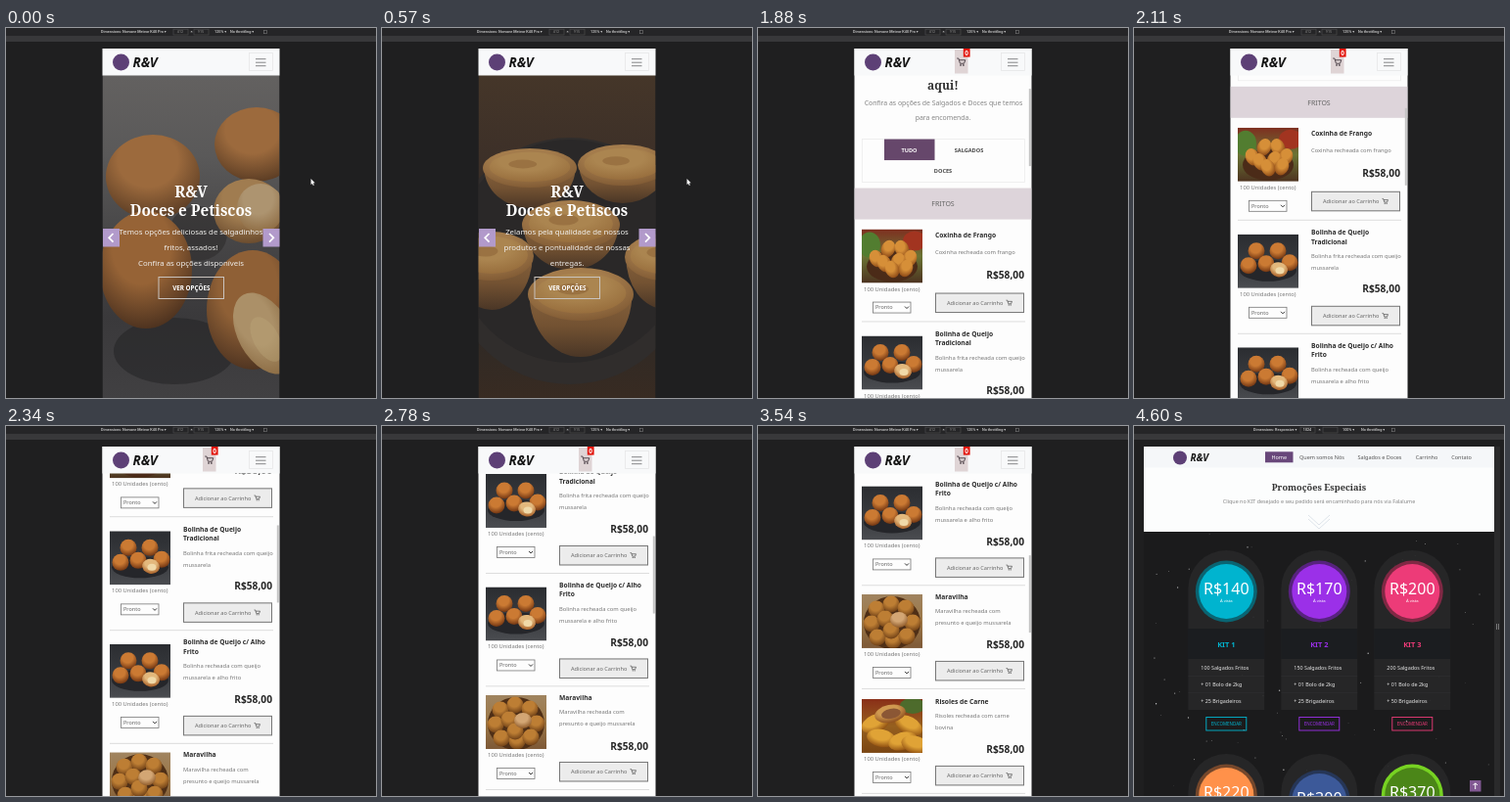
An HTML page with a canvas for the animation above (4630 ms loop, 378 by 378 pixels).

```html
<!DOCTYPE html>
<html lang="pt-BR">
<head>
<meta charset="utf-8">
<title>Loja de doces e petiscos</title>
<style>
html, body { margin: 0; width: 100%; height: 100%; overflow: hidden; background: #1f1f1f; }
canvas { display: block; width: 378px; height: 378px; }
</style>
</head>
<body>
<canvas id="stage"></canvas>
<script>
const SIZE = 378, LOOP = 4630, SHOP_AT = 1540, DESKTOP_AT = 3620;
const SANS = '"Noto Sans", "Open Sans", sans-serif';
const SERIF = '"Noto Serif", serif';
const UI = 'Roboto, sans-serif';

const canvas = document.getElementById('stage');
const ctx = canvas.getContext('2d');
const ratio = window.devicePixelRatio || 1;
canvas.width = canvas.height = Math.round(SIZE * ratio);

function rect(x, y, w, h, color) {
  ctx.fillStyle = color;
  ctx.fillRect(x, y, w, h);
}

function frame(x, y, w, h, color, line = 1) {
  ctx.strokeStyle = color;
  ctx.lineWidth = line;
  ctx.strokeRect(x, y, w, h);
}

function oval(x, y, rx, ry, color, turn = 0, end = 7) {
  ctx.fillStyle = color;
  ctx.beginPath();
  ctx.ellipse(x, y, rx, ry, turn, 0, end);
  ctx.fill();
}

function path(points, color, line = 1) {
  ctx.strokeStyle = color;
  ctx.lineWidth = line;
  ctx.beginPath();
  points.forEach(([x, y]) => ctx.lineTo(x, y));
  ctx.stroke();
}

function text(str, x, y, size, color, { weight = 400, family = SANS, align = 'left' } = {}) {
  ctx.font = `${weight} ${size}px ${family}`;
  ctx.textAlign = align;
  ctx.textBaseline = 'alphabetic';
  ctx.fillStyle = color;
  ctx.fillText(str, x, y + size * 0.35);
}

const centered = (str, x, y, size, color, opts) =>
  text(str, x, y, size, color, { align: 'center', ...opts });

function clipped(x, y, w, h, draw) {
  ctx.save();
  ctx.beginPath();
  ctx.rect(x, y, w, h);
  ctx.clip();
  draw();
  ctx.restore();
}

function vertical(y0, y1, ...colors) {
  const g = ctx.createLinearGradient(0, y0, 0, y1);
  colors.forEach((c, i) => g.addColorStop(i / (colors.length - 1), c));
  return g;
}

// Round piece of food lit from above
function ball(x, y, rx, ry, light, dark, turn = 0) {
  ctx.save();
  ctx.translate(x, y);
  ctx.rotate(turn);
  ctx.scale(rx, ry);
  const g = ctx.createRadialGradient(-0.1, -0.4, 0.1, -0.1, -0.4, 1.45);
  g.addColorStop(0, light);
  g.addColorStop(0.4, light);
  g.addColorStop(1, dark);
  oval(0, 0, 1, 1, g);
  ctx.restore();
}

function seeded(seed) {
  return () => (seed = (seed * 16807) % 2147483647) / 2147483647;
}

function toolbar(desktop) {
  const gray = '#d4d4d4', dim = '#777';
  rect(0, 0, SIZE, 8, '#252527');
  rect(0, 8, SIZE, 6, '#38383a');
  const [title, titleX, inputs, zoom, zoomX, throttleX] = desktop
    ? ['Dimensions: Responsive ▾', 122, [170, 193], '100% ▾', 213, 232]
    : ['Dimensions: Norvane Meteor K40 Pro ▾', 97, [171, 192], '125% ▾', 213, 229];
  const style = { family: UI, weight: 500 };
  text(title, titleX, 4, 3.8, gray, style);
  inputs.forEach((x, i) => {
    frame(x, 1.2, 15, 5.8, '#4a4a4c', 0.7);
    const value = desktop ? ['1024', ''][i] : ['412', '915'][i];
    centered(value, x + 7, 4, 3.7, desktop ? gray : dim, style);
  });
  centered('×', 189.5, 4, 4, gray, style);
  text(zoom, zoomX, 4, 3.8, gray, style);
  text('No throttling ▾', throttleX, 4, 3.8, gray, style);
  frame(263.3, 2.3, 3, 3.4, dim, 0.6);
}

function brand(x, y, r, size) {
  oval(x, y, r, r, '#5d4076');
  text('R&V', x + r + 3.5, y, size, '#151515', { weight: 'italic 800' });
}

function cartIcon(x, y, s, color) {
  path([[x - s, y - s * 0.8], [x - s * 0.6, y - s * 0.8], [x - s * 0.25, y + s * 0.4],
    [x + s * 0.7, y + s * 0.4], [x + s, y - s * 0.4], [x - s * 0.5, y - s * 0.4]], color, s * 0.22);
  oval(x - s * 0.1, y + s * 0.8, s * 0.2, s * 0.2, color);
  oval(x + s * 0.55, y + s * 0.8, s * 0.2, s * 0.2, color);
}

function mobileNav(withCart) {
  rect(98.5, 21, 181, 27.5, '#f8f9fa');
  brand(117.5, 35, 8.5, 13.5);
  frame(248.5, 25.5, 24, 18, '#e6e7e8', 0.8);
  [31.2, 34.7, 38.2].forEach(y => rect(255, y, 10.5, 1, '#858688'));
  if (!withCart) return;
  rect(201, 22, 13.5, 24.5, '#dfd4d5');
  cartIcon(207.5, 34.5, 4.3, '#4b4046');
  rect(209.8, 21, 6.8, 8.6, '#e3170d');
  centered('0', 213.2, 25.3, 6.5, '#fff', { weight: 700 });
}

function croquettePhoto() {
  rect(98, 48, 182, 330, vertical(48, 378, '#636160', '#5a5959', '#474647', '#3a393b', '#414042'));
  oval(172, 330, 62, 34, 'rgba(38,37,39,.6)');
  oval(196, 210, 30, 28, 'rgba(44,42,42,.55)');
  const light = '#9c6a3d', dark = '#593b23';
  ball(256, 119, 43, 38, light, dark);
  ball(150, 152, 48, 43, light, dark);
  ball(248, 187, 36, 33, '#a07c50', '#694a2d');
  ball(260, 184, 24, 25, '#ad9470', '#8d6b42');
  ball(143, 247, 47, 60, '#966336', '#4a301e');
  ball(252, 288, 47, 61, '#8f6036', '#4c3220');
  ball(264, 312, 27, 45, '#ab9068', '#8a6a42', -0.5);
  oval(266, 318, 13, 25, 'rgba(190,169,125,.35)', -0.5);
}

function tart(x, y, rx, ry, bottom) {
  oval(x, y, rx * 0.97, bottom - y, vertical(y, bottom, '#85613c', '#735232', '#4a3626'), 0, Math.PI);
  ball(x, y, rx, ry, '#a47c4c', '#805a34');
  ball(x, y - 1, rx * 0.86, ry * 0.76, '#ab8550', '#976d3c');
  oval(x - rx * 0.15, y - ry * 0.2, rx * 0.3, ry * 0.22, 'rgba(112,70,34,.3)');
}

function tartPhoto() {
  rect(98, 48, 182, 330, vertical(48, 378, '#453629', '#3d3028', '#302a27', '#2d2926', '#382b22'));
  oval(192, 238, 125, 126, '#302d2c');
  oval(192, 228, 116, 114, '#2a2828');
  tart(151, 143, 48, 20, 184);
  tart(246, 140, 46, 21, 179);
  tart(193, 201, 50, 25, 247);
  tart(112, 233, 43, 25, 288);
  tart(289, 234, 41, 24, 287);
  tart(203, 272, 54, 27, 336);
}

const slides = [
  { photo: croquettePhoto,
    lines: ['Temos opções deliciosas de salgadinhos', 'fritos, assados!', 'Confira as opções disponíveis'] },
  { photo: tartPhoto,
    lines: ['Zelamos pela qualidade de nossos', 'produtos e pontualidade de nossas', 'entregas.'] }
];

function slide({ photo, lines }, dx) {
  if (Math.abs(dx) >= 181) return;
  ctx.save();
  ctx.translate(dx, 0);
  clipped(98.5, 48, 181, 330, photo);
  const title = { family: SERIF, weight: 700 };
  centered('R&V', 189, 168, 15.5, '#fff', title);
  centered('Doces e Petiscos', 189, 187, 15.3, '#fff', title);
  lines.forEach((line, i) => centered(line, 189, 208 + i * 16, 7.8, '#f1f0ee'));
  frame(156, 254.5, 66.5, 22, '#c9c3be');
  centered('VER OPÇÕES', 189.3, 265.5, 6.3, '#fff', { weight: 700 });
  ctx.restore();
}

function carousel(t) {
  const p = Math.min(1, Math.max(0, (t - 90) / 390));
  const shift = 181 * p * p * (3 - 2 * p);
  clipped(98.5, 48, 181, 330, () => {
    slide(slides[0], -shift);
    slide(slides[1], 181 - shift);
  });
  [[99, -1], [262.5, 1]].forEach(([x, dir]) => {
    rect(x, 205, 17, 18.5, '#b29acb');
    const cx = x + 8.5;
    path([[cx - 2 * dir, 210], [cx + 2.3 * dir, 214.3], [cx - 2 * dir, 218.6]], '#fff', 1.7);
  });
  mobileNav(false);
}

function mousePointer(x, y) {
  ctx.fillStyle = '#f4f4f4';
  ctx.beginPath();
  [[0, 0], [0, 6], [1.4, 4.9], [2.4, 7], [3.3, 6.5], [2.4, 4.5], [4.2, 4.3]]
    .forEach(([dx, dy]) => ctx.lineTo(x + dx, y + dy));
  ctx.fill();
}

const thumbs = {
  drops() {
    rect(0, 0, 62, 55, vertical(0, 55, '#7e2f20', '#6a7434', '#4d3320'));
    oval(8, 16, 11, 13, '#527d30');
    oval(54, 12, 12, 10, '#a23420');
    oval(31, 38, 26, 16, '#4b2b18');
    [[15, 30], [27, 20], [41, 20], [49, 30], [23, 35], [37, 33], [31, 41], [45, 40]]
      .forEach(([x, y], i) => ball(x, y, 7, 9, '#d68f38', '#874414', i % 2 ? 0.4 : -0.4));
  },
  balls() {
    rect(0, 0, 62, 55, vertical(0, 55, '#2b2d31', '#37393d', '#4a4c50'));
    oval(31, 37, 29, 11, '#25262a');
    [[19, 17], [41, 17], [11, 32], [29, 30], [53, 29]]
      .forEach(([x, y]) => ball(x, y, 8.5, 8.5, '#cb7a33', '#6c3110'));
    ball(42, 36, 9, 7.5, '#e3b87c', '#a45a22', 0.2);
    oval(43, 37, 4.5, 3.5, '#f0d9a8');
  },
  bowl() {
    rect(0, 0, 62, 55, vertical(0, 55, '#a08460', '#9b7747', '#7d5836'));
    oval(31, 29, 29, 27, '#4f2f16');
    [[15, 15], [30, 10], [45, 14], [10, 30], [24, 25], [52, 29], [16, 44], [32, 47], [46, 43], [30, 37]]
      .forEach(([x, y]) => ball(x, y, 8.5, 8.5, '#bd7e34', '#6b3d15'));
    ball(38, 26, 9, 8, '#d3a674', '#8a5524');
  },
  turnovers() {
    rect(0, 0, 62, 55, vertical(0, 55, '#8a2f18', '#96601f', '#7a4512'));
    oval(52, 7, 13, 8, '#4d6b2c');
    [[14, 25, -0.4], [48, 27, 0.5], [20, 40, 0.2], [42, 43, -0.3], [55, 47, 0.3]]
      .forEach(([x, y, turn]) => ball(x, y, 15, 9, '#e0a336', '#8c4c10', turn));
    ball(29, 15, 16, 9, '#d09950', '#8a4c1c', -0.2);
    oval(30, 15, 10, 5, '#8b5735', -0.2);
  }
};

const products = [
  { top: 206, name: ['Coxinha de Frango'], nameY: 6, about: ['Coxinha recheada com frango'], aboutY: 23, art: 'drops', price: 47, button: 65, end: 94 },
  { top: 315, name: ['Bolinha de Queijo', 'Tradicional'], nameY: -2, about: ['Bolinha frita recheada com queijo', 'mussarela'], aboutY: 22.3, art: 'balls', price: 56, button: 73, end: 101 },
  { top: 430.5, name: ['Bolinha de Queijo c/ Alho', 'Frito'], nameY: -2, about: ['Bolinha recheada com queijo', 'mussarela e alho frito'], aboutY: 22.3, art: 'balls', price: 57, button: 73, end: 101 },
  { top: 541, name: ['Maravilha'], nameY: 2.5, about: ['Maravilha recheada com', 'presunto e queijo mussarela'], aboutY: 17.3, art: 'bowl', price: 52, button: 68, end: 96 },
  { top: 648, name: ['Risoles de Carne'], nameY: 2.5, about: ['Risoles recheada com carne', 'bovina'], aboutY: 17.3, art: 'turnovers', price: 52, button: 68, end: 96 }
];

function product({ top, name, nameY, about, aboutY, art, price, button, end }) {
  ctx.save();
  ctx.translate(106, top);
  clipped(0, 0, 62, 55, thumbs[art]);
  ctx.restore();
  centered('100 Unidades (cento)', 136.8, top + 61, 5.8, '#777');
  const selectY = top + 80;
  frame(117.5, selectY - 5.5, 38.5, 11, '#777', 0.8);
  text('Pronto', 120, selectY, 5.5, '#666');
  path([[150, selectY - 1], [152, selectY + 1], [154, selectY - 1]], '#333', 1);
  name.forEach((line, i) => text(line, 181, top + nameY + i * 9.4, 6.7, '#2b2b2b', { weight: 600 }));
  about.forEach((line, i) => text(line, 181, top + aboutY + i * 12, 5.8, '#777'));
  text('R$58,00', 272, top + price, 10.2, '#262626', { weight: 600, align: 'right' });
  rect(181, top + button, 91, 20.5, '#ececec');
  frame(181.5, top + button + 0.5, 90, 19.5, '#777', 1);
  text('Adicionar ao Carrinho', 193, top + button + 10.3, 5.6, '#666');
  cartIcon(256.5, top + button + 10, 3, '#444');
  rect(106, top + end, 167, 0.8, '#d4d4d4');
}

const scrollStops = [[SHOP_AT, -40], [1880, 0], [2340, 207.5], [3180, 319], [3540, 369], [DESKTOP_AT, 376]];

function scrollAt(t) {
  const i = Math.max(1, scrollStops.findIndex(([time]) => time >= t));
  const [t0, y0] = scrollStops[i - 1], [t1, y1] = scrollStops[i];
  return y0 + (y1 - y0) * (t - t0) / (t1 - t0);
}

function shop(t) {
  const scroll = scrollAt(t);
  rect(98.5, 21, 181, 357, '#fdfdfd');
  clipped(98.5, 48, 181, 330, () => {
    ctx.save();
    ctx.translate(0, -scroll);
    const title = { family: SERIF, weight: 600 };
    centered('Faça seu pedido', 189, 41, 12, '#333', title);
    centered('aqui!', 189, 59, 12, '#333', title);
    centered('Confira as opções de Salgados e Doces que temos', 189.5, 77.5, 6.9, '#858585');
    centered('para encomenda.', 189, 92, 6.9, '#858585');
    frame(106.5, 114, 166, 44, '#ededed', 0.8);
    rect(129, 114, 51.5, 21.5, '#66476b');
    const tab = { weight: 600 };
    centered('TUDO', 154.5, 125, 5.6, '#fff', tab);
    centered('SALGADOS', 215.5, 125, 5.6, '#444', tab);
    centered('DOCES', 189, 146.5, 5.6, '#444', tab);
    rect(98.5, 164, 181, 32, '#ddd4da');
    centered('FRITOS', 189, 180.5, 7, '#666');
    products.forEach(product);
    ctx.restore();
    rect(276.8, 62 + scroll * 0.19, 2, 79, '#c4c4c4');
  });
  mobileNav(true);
}

const random = seeded(4217);
const stars = Array.from({ length: 85 }, () => ({
  x: 16 + random() * 350, y: random() * 270, r: 0.25 + random() * 0.5,
  vx: (random() - 0.5) * 0.008, vy: (random() - 0.5) * 0.008, alpha: 0.2 + random() * 0.6
}));

function starfield(t) {
  const dt = t - 4600;
  for (const { x, y, r, vx, vy, alpha } of stars) {
    oval(x + vx * dt, 108 + (y + vy * dt + 270) % 270, r, r, `rgba(255,255,255,${alpha})`);
  }
}

const kits = [
  { price: 140, color: '#00b4cf', ring: '#0a6472', first: '100 Salgados Fritos', last: '+ 25 Brigadeiros' },
  { price: 170, color: '#9b30e8', ring: '#57227e', first: '150 Salgados Fritos', last: '+ 25 Brigadeiros' },
  { price: 200, color: '#ed3b78', ring: '#802844', first: '200 Salgados Fritos', last: '+ 50 Brigadeiros' },
  { price: 220, color: '#ff914a', ring: '#75472b', y: 377 },
  { price: 300, color: '#3c5999', ring: '#263657', y: 383 },
  { price: 370, color: '#4b8618', ring: '#77d322', y: 377 }
];

function cardBack(x, top, bottom) {
  ctx.fillStyle = 'rgba(39,39,40,.9)';
  ctx.beginPath();
  ctx.arc(x, top + 39, 39, Math.PI, 0);
  ctx.lineTo(x + 39, bottom);
  ctx.lineTo(x - 39, bottom);
  ctx.fill();
}

function kitCard({ price, color, ring, first, last, y = 169 }, i) {
  const x = 94.3 + (i % 3) * 95;
  cardBack(x, i < 3 ? 127 : 335, i < 3 ? 290 : 378);
  oval(x, y, 31.5, 31.5, ring);
  oval(x, y, 28, 28, color);
  centered('R$' + price, x, y - 3, 16, '#fff');
  centered('À vista', x, y + 10, 4.2, '#fff');
  if (!first) return;
  rect(x - 39, 207, 78, 31, '#1b1d20');
  centered('KIT ' + (i + 1), x, 223, 7.4, color, { weight: 600 });
  [first, '+ 01 Bolo de 2kg', last].forEach((line, n) =>
    text(line, x - 26, 247 + n * 17, 5.4, '#e8e8e8'));
  [255.5, 272.5].forEach(lineY => rect(x - 39, lineY, 78, 0.5, '#303032'));
  frame(x - 20.5, 297.5, 41, 13.5, color, 0.9);
  centered('ENCOMENDAR', x, 304.3, 4.5, color);
}

function desktop(t) {
  rect(10, 21, 358, 357, '#1b1b1c');
  starfield(t);
  kits.forEach(kitCard);
  rect(10, 21, 358, 87, '#fcfdfd');
  rect(10, 21, 358, 21.5, '#f5f7f9');
  brand(47, 32.5, 7, 10);
  rect(134, 26.3, 28.5, 11, '#68477a');
  centered('Home', 148.2, 31.7, 5.5, '#fff');
  [['Quem somos Nós', 192], ['Salgados e Doces', 251], ['Carrinho', 299], ['Contato', 334.5]]
    .forEach(([label, x]) => centered(label, x, 31.7, 5.5, '#555'));
  centered('Promoções Especiais', 189, 62.5, 9.2, '#333', { family: SERIF, weight: 600 });
  centered('Clique no KIT desejado e seu pedido será encaminhado para nós via Falalume', 189, 77.5, 5.4, '#858585');
  [91, 95].forEach(y => path([[178, y], [189, y + 10], [200, y]], '#dbe1e8', 0.9));
  rect(343, 362, 11.5, 11.5, '#825993');
  path([[346.5, 367], [348.7, 364.8], [350.9, 367]], '#fff', 1);
  path([[348.7, 365], [348.7, 371]], '#fff', 1);
  rect(368, 21, 6, 357, '#2a2a2b');
  rect(370.3, 202, 0.7, 6, '#999');
  rect(372, 202, 0.7, 6, '#999');
}

function draw(t) {
  ctx.setTransform(ratio, 0, 0, ratio, 0, 0);
  rect(0, 0, SIZE, SIZE, '#1f1f20');
  toolbar(t >= DESKTOP_AT);
  if (t < SHOP_AT) {
    carousel(t);
    mousePointer(311.5, 154);
  } else if (t < DESKTOP_AT) {
    shop(t);
  } else {
    desktop(t);
  }
}

const start = performance.now();
function tick() {
  draw((performance.now() - start) % LOOP);
  requestAnimationFrame(tick);
}
tick();
</script>
</body>
</html>
```
